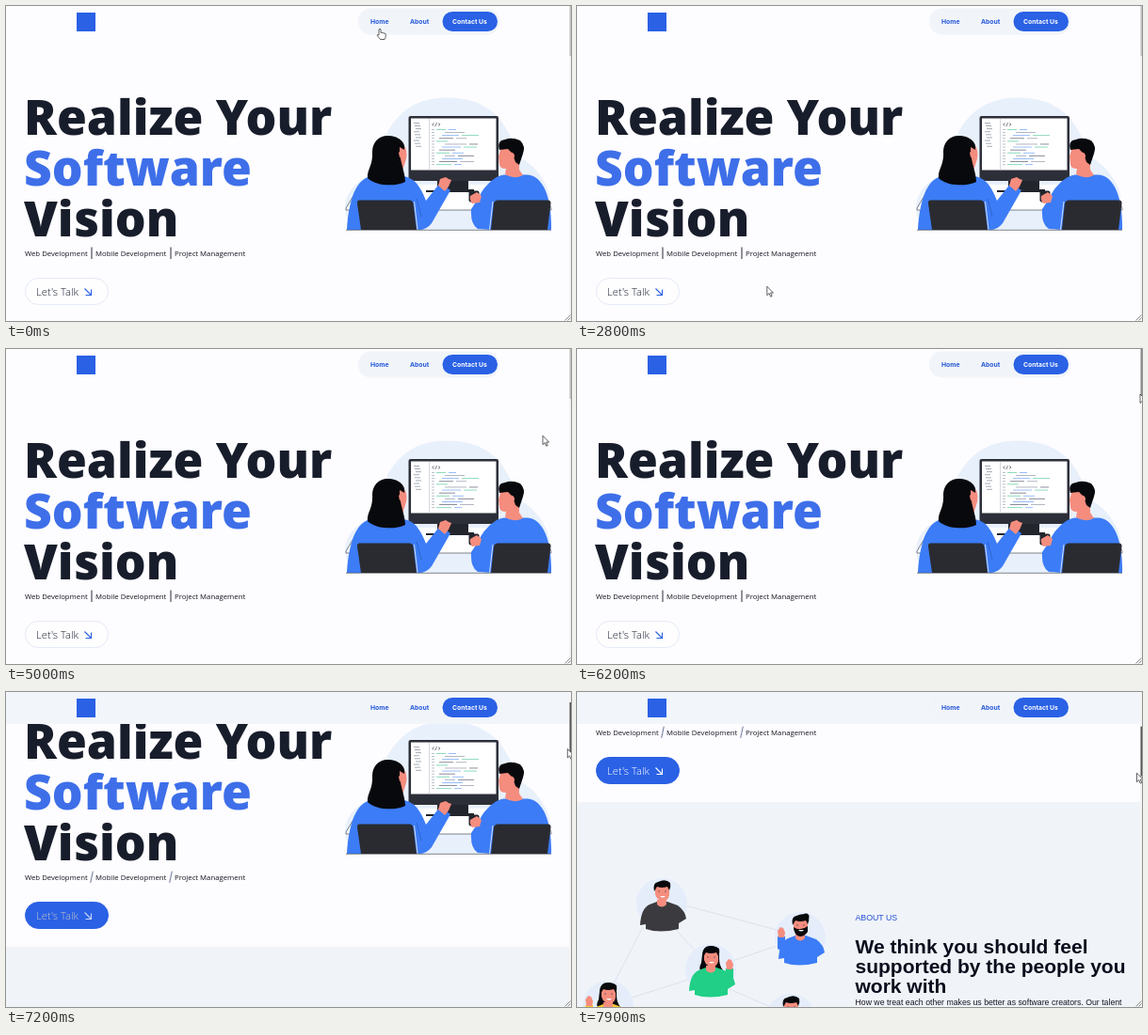
An HTML page for the animation above (8000 ms loop, 600x335 px).

```html
<!DOCTYPE html>
<html lang="en">
<head>
<meta charset="utf-8">
<title>Software studio landing page</title>
<style>
  html, body { margin: 0; width: 100%; height: 100%; overflow: hidden; background: #fdfcff; }
  svg { display: block; width: 100vw; height: 100vh; }
  text { white-space: pre; }
  .title { font: 800 51.6px "Open Sans", "Noto Sans", sans-serif; fill: #181d2b; }
  .tags { font: 400 7.75px "Open Sans", "Noto Sans", sans-serif; fill: #14161f; }
  .talk { font: 300 11.3px "Open Sans", "Noto Sans", sans-serif; }
  .nav { font: 700 6.8px Inter, "Liberation Sans", sans-serif; fill: #2356d9; }
  .about { font: 400 8.75px "Liberation Sans", Arial, sans-serif; fill: #2450cf; }
  .lead { font: 700 21px "Liberation Sans", Arial, sans-serif; fill: #0b0d1c; }
  .body { font: 400 8.72px "Liberation Sans", Arial, sans-serif; fill: #14161f; }
  .skin { fill: #f58d7e; }
  .hair { fill: #08090c; }
  .shirt { fill: #3c7cf6; }
  .chair { fill: #2a2b31; }
  .thin { fill: none; stroke: #30333d; stroke-width: .6; }
  .halo { fill: #e5edfb; }
</style>
</head>
<body>
<svg id="stage" viewBox="0 0 600 335" preserveAspectRatio="none">
  <rect width="600" height="335" fill="#fdfcff"/>

  <g id="page">
    <text class="title" x="19" y="137">Realize Your</text>
    <text class="title" x="19" y="191" style="fill:#3e6fe9">Software</text>
    <text class="title" x="19" y="244.5">Vision</text>

    <text class="tags" x="20" y="265.5">Web Development</text>
    <text class="tags" x="95" y="265.5">Mobile Development</text>
    <text class="tags" x="179" y="265.5">Project Management</text>
    <rect class="bar" x="90.5" y="256.5" width="1" height="12.5"/>
    <rect class="bar" x="174.5" y="256.5" width="1" height="12.5"/>

    <rect id="pill" x="20.5" y="289.5" width="88" height="28" rx="14" stroke-width="1"/>
    <text id="talk" class="talk" x="32" y="308">Let's Talk</text>
    <path id="arrow" d="M83.5 300.5 L90.5 307.5 M90.5 301.5 V307.5 H84.5" fill="none" stroke-width="1.1"/>

    <!-- Two people at a desk -->
    <g id="desk">
      <path fill="#e8f0fb" d="M368 238C352 212 362 192 386 180C398 156 404 98 468 97.5C520 98 532 128 545 160C575 178 588 212 570 238Z"/>
      <path fill="#fff" d="M376 190H567L579 217H361Z"/>
      <path class="thin" d="M385 190H376L361 215V217H380M558 190H567L579 215V217H570M430 217H520"/>
      <path fill="#23252d" d="M458 185H491V195H497V198H446V196H458Z"/>
      <rect x="427.5" y="117" width="95.5" height="69" rx="2" fill="#2d2f38"/>
      <rect x="430" y="119.5" width="90.5" height="55" fill="#fff"/>
      <path stroke="#c3c8d2" stroke-width=".7" d="M449.5 120V174.500"/>
      <path class="thin" d="M454.500 124.500L452.500 126L454.500 127.500M457.500 124L456 128M459 124.500L461 126L459 127.500"/>
      <g id="code"></g>

      <path class="shirt" d="M362 238C364 207 371 184 388 181H421C434 182 440 192 446 207L461 188L472 196L452 231Q446 239 436 238Z"/>
      <path d="M436 205L441 224" class="thin" style="stroke:#2456b8"/>
      <path class="skin" d="M459 191L461 184L467 182L470 184L473 185L470 192L466 197Z"/>
      <path class="skin" d="M413 150H424Q427 158 424 166L420 178H411Z"/>
      <path class="hair" d="M405 138C418 138 425 146 423 153L418 150C417 163 424 176 424 187C414 192 393 192 384 183C383 174 390 169 389 155C389 145 396 138 405 138Z"/>
      <path class="skin" d="M417 156a2.500 3 0 1 1 4 4l-3 1z"/>
      <path class="chair" d="M375 206.500H429Q432 207 432.500 210L436 238H377L373 210Q372.500 207 375 206.500Z"/>
      <path d="M433.500 208L437 238" stroke="#f4f7fc" stroke-width=".8"/>

      <path class="shirt" d="M579 238C580 208 572 181 554 179.500H529C520 180 510 190 505 198L498 210L494 216Q493 232 501 237L516 238Z"/>
      <rect x="491.500" y="196.500" width="11" height="12" rx="2" fill="#23252d"/>
      <path class="skin" d="M493 202L500 198L505 202L503 209L495 210Q492 206 493 202Z"/>
      <path class="skin" d="M526 150H545V174L549 180Q539 185 530 179L531 173Q524 173 524 168L523 160Z"/>
      <path class="hair" d="M524 153Q521 143 530 142Q537 139 546 143Q552 149 549 157L545 169L541 166L538 157L533 152Z"/>
      <path class="skin" d="M535 157a2.500 3 0 1 1 4 5l-3-1z"/>
      <path class="chair" d="M522 206.500H576Q579 207 578.500 210L575 238H515L518 210Q518.500 207 522 206.500Z"/>
      <path d="M517 208L513.500 238" stroke="#f4f7fc" stroke-width=".8"/>
      <path class="thin" d="M361 238.300H579"/>
    </g>

    <rect y="337" width="600" height="300" fill="#f0f4f9"/>

    <!-- Connected team, five portraits -->
    <path fill="none" stroke="#dde2ea" stroke-width="1" d="M115 447L212 473M165 506L212 490M70 470L40 528M104 472L128 498M58 545L118 526M162 536L206 555"/>
    <g id="team"></g>

    <text class="about" x="295.500" y="463">ABOUT US</text>
    <text class="lead" x="295.500" y="497.500">We think you should feel</text>
    <text class="lead" x="295.500" y="519">supported by the people you</text>
    <text class="lead" x="295.500" y="540">work with</text>
    <text class="body" x="295.500" y="553">How we treat each other makes us better as software creators. Our talent</text>
  </g>

  <rect id="header" width="600" height="34" fill="#f2f5fa"/>
  <rect x="374" y="2.500" width="150" height="28" rx="14" fill="#f1f5fa"/>
  <rect x="75" y="7" width="20" height="20" fill="#2a61e5"/>
  <text class="nav" x="387" y="19">Home</text>
  <text class="nav" x="429" y="19">About</text>
  <rect x="463.500" y="6" width="58.500" height="21" rx="10.500" fill="#2a61e5"/>
  <text class="nav" x="474" y="19" style="fill:#fff">Contact Us</text>

  <rect x="598" width="2" height="335" fill="#f4f4f6"/>
  <rect id="thumb" x="598.500" width="1.500" height="53"/>
  <path d="M593.500 334.500L599.500 328.500M596.500 334.500L599.500 331.500" stroke="#777" stroke-width=".8"/>

  <path id="pointer" fill="#fff" stroke="#222" stroke-width=".7" stroke-linejoin="round"
    d="M0 0V9.500L2.200 7.400L3.800 11L5.300 10.300L3.700 6.900H6.600Z"/>
  <path id="hand" fill="#fff" stroke="#222" stroke-width=".7" stroke-linejoin="round"
    d="M1 1Q2-.6 3 1V4.500Q4 3.600 4.800 4.700Q6 4 6.600 5.100Q8 4.600 8.200 6V8Q8.200 10 7 11.500H2.500L-.8 7.500Q-1 5.800 1 7Z"/>
</svg>

<script>
const LOOP = 8000, STEP = 100;
const $ = id => document.getElementById(id);
const SVG = "http://www.w3.org/2000/svg";

function add(parent, tag, attrs) {
  const node = document.createElementNS(SVG, tag);
  for (const key in attrs) node.setAttribute(key, attrs[key]);
  return parent.appendChild(node);
}

// Rows of code on the monitor
const inks = ["#7fd6b4", "#a9aeba", "#8db5f5", "#7d828e"];
function dash(x, y, width, fill) {
  add($("code"), "rect", { x, y, width, height: 0.9, fill });
}
for (let i = 0; i < 13; i++) {
  const y = 131 + i * 3.1;
  if (i < 9) dash(433 + (i % 3), y - 7, 6 + (i * 5) % 5, "#9a9fab");
  dash(452, y, 3, "#b5bac4");
  const start = 457 + (i * 7) % 4 * 3;
  const span = 10 + (i * 11) % 14;
  dash(start, y, span, inks[i % 4]);
  if (i % 3 !== 1) dash(start + span + 3, y, 8 + (i * 5) % 12, inks[(i + 2) % 4]);
}

// A portrait: halo, shoulders, optional long hair and a raised hand
function person({ x, y, shirt, long, bun, beard, wave }) {
  const g = add($("team"), "g", { transform: `translate(${x} ${y})` });
  const path = (d, cls, fill) => add(g, "path", fill ? { d, fill } : { d, class: cls });
  add(g, "circle", { r: 27, class: "halo" });
  if (long) path("M-9-16Q-8-26 1-25Q10-24 9-12Q9-4 13 1Q4 6-9 3Q-14 0-10-7Z", "hair");
  path("M-23 23Q-22 5-13 1L-5-2H6L17 2Q25 8 26 16L18 21V27Q-2 32-17 27V22Z", "", shirt);
  if (wave) {
    const side = wave * 20;
    path(`M${side - 4} 12L${side - 4}-1H${side + 4}L${side + 4} 17Z`, "", shirt);
    path(`M${side - 3} 0L${side - 4}-7L${side - 1}-11L${side + 2}-10L${side + 4}-5L${side + 3} 0Z`, "skin");
  }
  path("M-5-4H5V1Q0 6-5 1Z", "skin");
  path("M-7-18Q0-23 8-17V-9Q7-3 1-3Q-5-3-7-10Z", "skin");
  path("M-8-13Q-10-22-4-23Q4-27 9-22Q10-18 8-14L6-18Q0-16-5-18Z", "hair");
  if (bun) add(g, "circle", { cx: 6, cy: -22, r: 3.5, class: "hair" });
  if (beard) path("M-7-11Q0-6 8-12V-6Q3 1-3-2Q-7-5-7-11Z", "hair");
  path("M-4-13h2M3-13h2", "thin");
  path("M-2-8Q1-5 4-8Z", "", "#fff");
}
[
  { x: 90, y: 445, shirt: "#3b3b3f" },
  { x: 237, y: 481, shirt: "#3c7cf6", bun: true, beard: true, wave: -1 },
  { x: 142, y: 515, shirt: "#21cf86", long: true, wave: 1 },
  { x: 33, y: 554, shirt: "#f7c72f", long: true, wave: -1 },
  { x: 227, y: 568, shirt: "#f58d7e" }
].forEach(person);

// Keys: time followed by values
const scrollKeys = [[6500, 0], [6800, 10], [7000, 26], [7200, 66], [7500, 132], [7900, 220]];
const mouseKeys = [
  [0, 395, 24], [300, 394, 26], [1000, 322, 112], [1700, 255, 181], [2000, 246, 194],
  [2750, 190, 304], [3300, 320, 240], [3900, 429, 181], [4500, 535, 130],
  [5400, 598, 62], [6200, 598, 48], [6700, 598, 49.5], [7000, 597.5, 49.5],
  [7500, 594.5, 49.5], [7900, 594.5, 49.5]
];

function sample(keys, t) {
  if (t <= keys[0][0]) return keys[0].slice(1);
  for (let i = 1; i < keys.length; i++) {
    const [a, b] = [keys[i - 1], keys[i]];
    if (t <= b[0]) {
      const p = (t - a[0]) / (b[0] - a[0]);
      return a.slice(1).map((v, k) => v + (b[k + 1] - v) * p);
    }
  }
  return keys[keys.length - 1].slice(1);
}

function ramp(t, from, to) {
  const p = Math.min(1, Math.max(0, (t - from) / (to - from)));
  return p * p * (3 - 2 * p);
}

const mix = (a, b, p) => `rgb(${a.map((v, i) => Math.round(v + (b[i] - v) * p))})`;
const white = [255, 255, 255], blue = [42, 97, 229], dark = [29, 33, 48];
const bars = document.querySelectorAll(".bar");

function draw(t) {
  const [scroll] = sample(scrollKeys, t);
  const [x, y] = sample(mouseKeys, t);
  const travel = scroll / 6;
  const fill = ramp(t, 6550, 6900), ink = ramp(t, 7000, 7300);

  $("page").setAttribute("transform", `translate(0 ${-scroll})`);
  $("header").setAttribute("opacity", ramp(t, 6500, 6900));

  $("pill").setAttribute("fill", mix([254, 254, 255], blue, fill));
  $("pill").setAttribute("stroke", mix([228, 234, 246], blue, fill));
  $("talk").setAttribute("fill", mix(dark, white, ink));
  $("arrow").setAttribute("stroke", mix(blue, white, ink));
  bars.forEach(bar => {
    const cx = +bar.getAttribute("x") + 0.5;
    bar.setAttribute("transform", `rotate(${12 * fill} ${cx} 262.7)`);
    bar.setAttribute("fill", mix([40, 44, 56], [112, 124, 158], fill));
  });

  $("thumb").setAttribute("y", travel);
  $("thumb").setAttribute("fill", t < 5400 ? "#c1c1c1" : t < 6400 ? "#8a8a8a" : "#555");

  const onLink = t < 300;
  $("hand").setAttribute("visibility", onLink ? "visible" : "hidden");
  $("pointer").setAttribute("visibility", onLink ? "hidden" : "visible");
  $(onLink ? "hand" : "pointer").setAttribute("transform", `translate(${x} ${y + travel})`);
}

const origin = performance.now();
function tick() {
  const t = (performance.now() - origin) % LOOP;
  draw(Math.floor(t / STEP) * STEP);
  requestAnimationFrame(tick);
}
tick();
</script>
</body>
</html>
```
